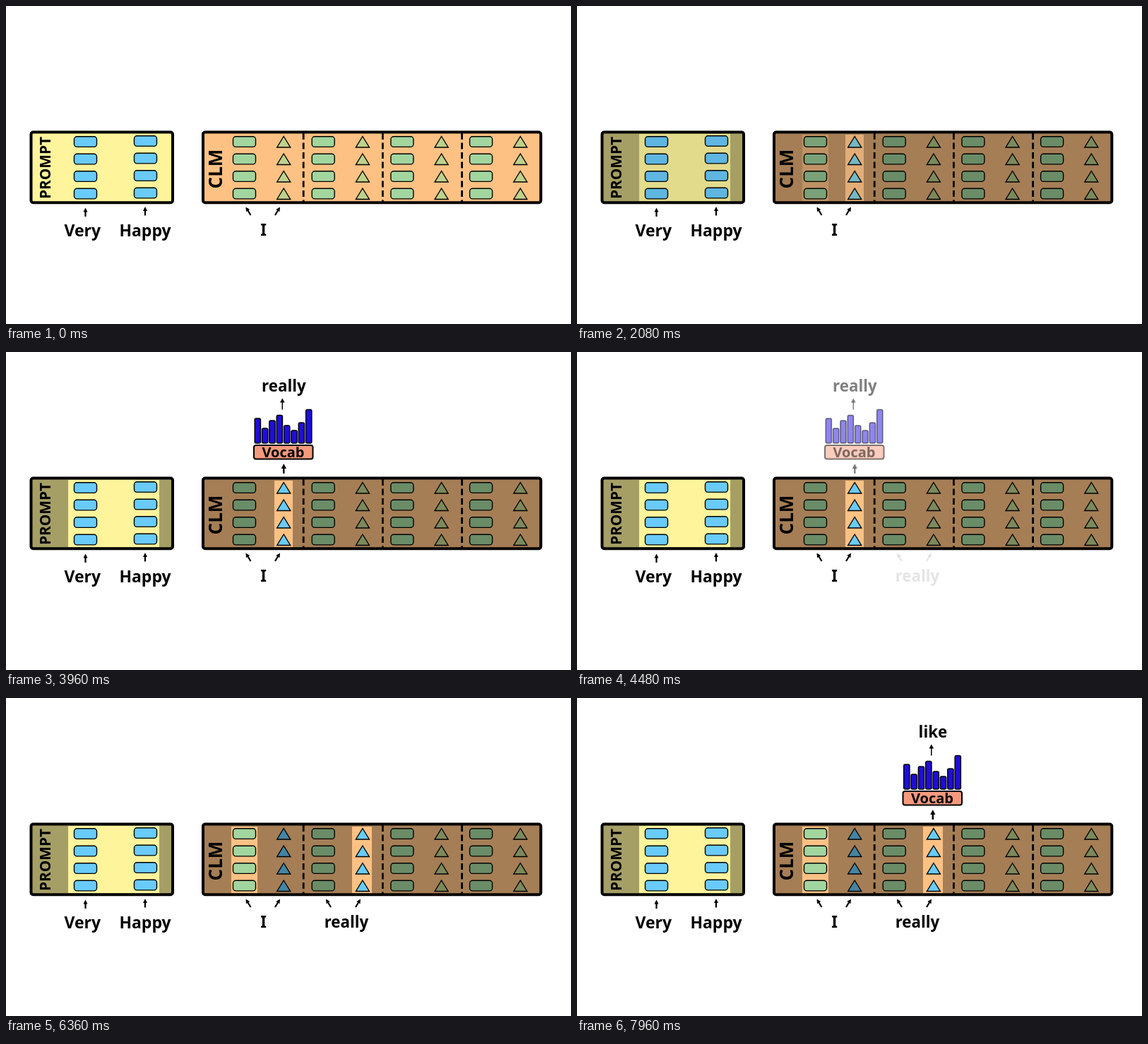
An HTML page with a canvas for the animation above (8 s loop, 800 by 450 pixels).

```html
<!DOCTYPE html>
<html lang="en">
<head>
<meta charset="utf-8">
<title>Prompted language model</title>
<style>
html, body { margin: 0; width: 100%; height: 100%; overflow: hidden; background: #fff; }
canvas { display: block; width: 800px; height: 450px; }
</style>
</head>
<body>
<canvas id="stage" width="800" height="450"></canvas>
<script>
const ctx = document.getElementById('stage').getContext('2d');
const LOOP = 8000;
const SHADE = 0.35;
const YELLOW = '#fdf49c', ORANGE = '#fdc184', BLUE = '#69cbfa', GREEN = '#a2d69e';
const OLIVE = [190, 210, 140], SKY = [105, 203, 250];
const ROWS = [192, 216.5, 241, 265.5];
const STEP = 111.7;
const PROMPT = [36, 179, 199, 99];
const CLM = [279, 179, 478, 99];
// Parts of the panels that can be lit on their own: x, y, width, height
const ZONES = {
  prompt: [88, 181, 129, 95],
  key1: [319, 182, 37, 94],
  out1: [380, 182, 26, 94],
  key2: [431, 182, 37, 94],
  out2: [490, 182, 28, 94]
};
const BAR_TOPS = [94, 108, 97, 89.5, 104, 111, 100, 81.5];

// Smooth rise from 0 to 1 between two times
function ramp(t, from, to) {
  const u = Math.min(1, Math.max(0, (t - from) / (to - from)));
  return u * u * (3 - 2 * u);
}

function mix(a, b, u) {
  return `rgb(${a.map((v, i) => Math.round(v + (b[i] - v) * u)).join(',')})`;
}

function box(x, y, w, h, r, fill, line) {
  ctx.beginPath();
  ctx.roundRect(x, y, w, h, r);
  if (fill) { ctx.fillStyle = fill; ctx.fill(); }
  if (line) { ctx.lineWidth = line; ctx.strokeStyle = '#000'; ctx.stroke(); }
}

function pill(x, y, fill) {
  box(x + 0.5, y - 7.2, 32, 14.6, 4, fill, 1.4);
}

function triangle(x, y, fill) {
  ctx.beginPath();
  ctx.moveTo(x, y - 7.5);
  ctx.lineTo(x + 9.5, y + 8);
  ctx.lineTo(x - 9.5, y + 8);
  ctx.closePath();
  ctx.fillStyle = fill;
  ctx.fill();
  ctx.lineWidth = 1.4;
  ctx.strokeStyle = '#000';
  ctx.stroke();
}

function label(text, x, y, size, turn = 0) {
  ctx.save();
  ctx.translate(x, y);
  ctx.rotate(turn);
  ctx.font = `700 ${size}px "Noto Sans", "Open Sans", sans-serif`;
  ctx.textAlign = 'center';
  ctx.fillStyle = '#000';
  ctx.fillText(text, 0, 0);
  ctx.restore();
}

function arrow(x1, y1, x2, y2, line = 2.2, head = 6, half = 3) {
  const len = Math.hypot(x2 - x1, y2 - y1);
  ctx.save();
  ctx.translate(x1, y1);
  ctx.rotate(Math.atan2(y2 - y1, x2 - x1));
  ctx.fillStyle = '#000';
  ctx.fillRect(0, -line / 2, len - head + 1, line);
  ctx.beginPath();
  ctx.moveTo(len, 0);
  ctx.lineTo(len - head, -half);
  ctx.lineTo(len - head, half);
  ctx.fill();
  ctx.restore();
}

function shown(alpha, draw) {
  if (alpha <= 0) return;
  ctx.save();
  ctx.globalAlpha = alpha;
  draw();
  ctx.restore();
}

function shade(dim, lit) {
  const zones = Object.entries(ZONES);
  ctx.beginPath();
  for (const r of [PROMPT, CLM, ...Object.values(ZONES)]) ctx.rect(...r);
  ctx.fillStyle = `rgba(0,0,0,${SHADE * dim})`;
  ctx.fill('evenodd');
  for (const [name, r] of zones) {
    ctx.fillStyle = `rgba(0,0,0,${SHADE * dim * (1 - lit[name])})`;
    ctx.fillRect(...r);
  }
}

function panels(dim, lit, blue) {
  box(...PROMPT, 3, YELLOW);
  box(...CLM, 3, ORANGE);
  for (const y of ROWS) {
    pill(96, y, BLUE);
    pill(181, y - 1, BLUE);
    for (let i = 0; i < 4; i++) {
      pill(321 + i * STEP, y, GREEN);
      triangle(393.2 + i * STEP, y, mix(OLIVE, SKY, blue[i] || 0));
    }
  }
  shade(dim, lit);

  ctx.strokeStyle = '#000';
  ctx.lineWidth = 2.8;
  ctx.setLineDash([9, 4.5]);
  for (let i = 0; i < 3; i++) {
    ctx.beginPath();
    ctx.moveTo(421.2 + i * 112.2, 180);
    ctx.lineTo(421.2 + i * 112.2, 278);
    ctx.stroke();
  }
  ctx.setLineDash([]);
  box(35.5, 178.5, 200.5, 99.7, 3, null, 4);
  box(279, 178.5, 478.3, 99.7, 3, null, 4);
  label('PROMPT', 62.5, 229, 20.8, -Math.PI / 2);
  label('CLM', 306, 230.5, 26, -Math.PI / 2);
}

function feed(word, x, left, right) {
  arrow(left + 7, 296, left, 284.5);
  arrow(right - 7, 296, right, 284.5);
  label(word, x, 325, 22.3);
}

function vocab(x, word) {
  arrow(x + 0.3, 172, x + 0.3, 158, 2.4, 7, 3.6);
  box(x - 42, 132, 83.5, 19.5, 3, '#f5997d', 2);
  label('Vocab', x - 0.5, 149, 20);
  BAR_TOPS.forEach((top, i) => box(x - 40.8 + i * 10.35, top, 8.2, 129 - top, 2, '#1f0cdb', 1.5));
  arrow(x - 1.7, 81.5, x - 1.7, 65.5, 1.5, 6, 3.3);
  label(word, x + 0.4, 56, 22.3);
}

function draw(t) {
  const dim = ramp(t, 560, 1060);
  const turn1 = ramp(t, 1760, 2260);
  const next = ramp(t, 4540, 5040);
  const turn2 = ramp(t, 5760, 6260);
  const lit = {
    prompt: turn1 * (1 - next) + turn2,
    key1: 1 - turn1 + next,
    out1: turn1 * (1 - next),
    key2: next * (1 - turn2),
    out2: turn2
  };

  ctx.fillStyle = '#fff';
  ctx.fillRect(0, 0, 800, 450);
  panels(dim, lit, [turn1, turn2]);

  arrow(112.5, 298, 112.5, 285.5);
  arrow(197, 296.5, 197, 284);
  label('Very', 108.3, 326, 23);
  label('Happy', 197, 326, 23);
  feed('I', 364.5, 339.5, 388);
  shown(ramp(t, 4400, 4800), () => feed('really', 482, 453, 502));
  shown(ramp(t, 3440, 3840) - ramp(t, 4280, 4680), () => vocab(393, 'really'));
  shown(ramp(t, 7440, 7840), () => vocab(503.5, 'like'));
}

function frame(now) {
  draw(now % LOOP);
  requestAnimationFrame(frame);
}
draw(0);
requestAnimationFrame(frame);
</script>
</body>
</html>
```
